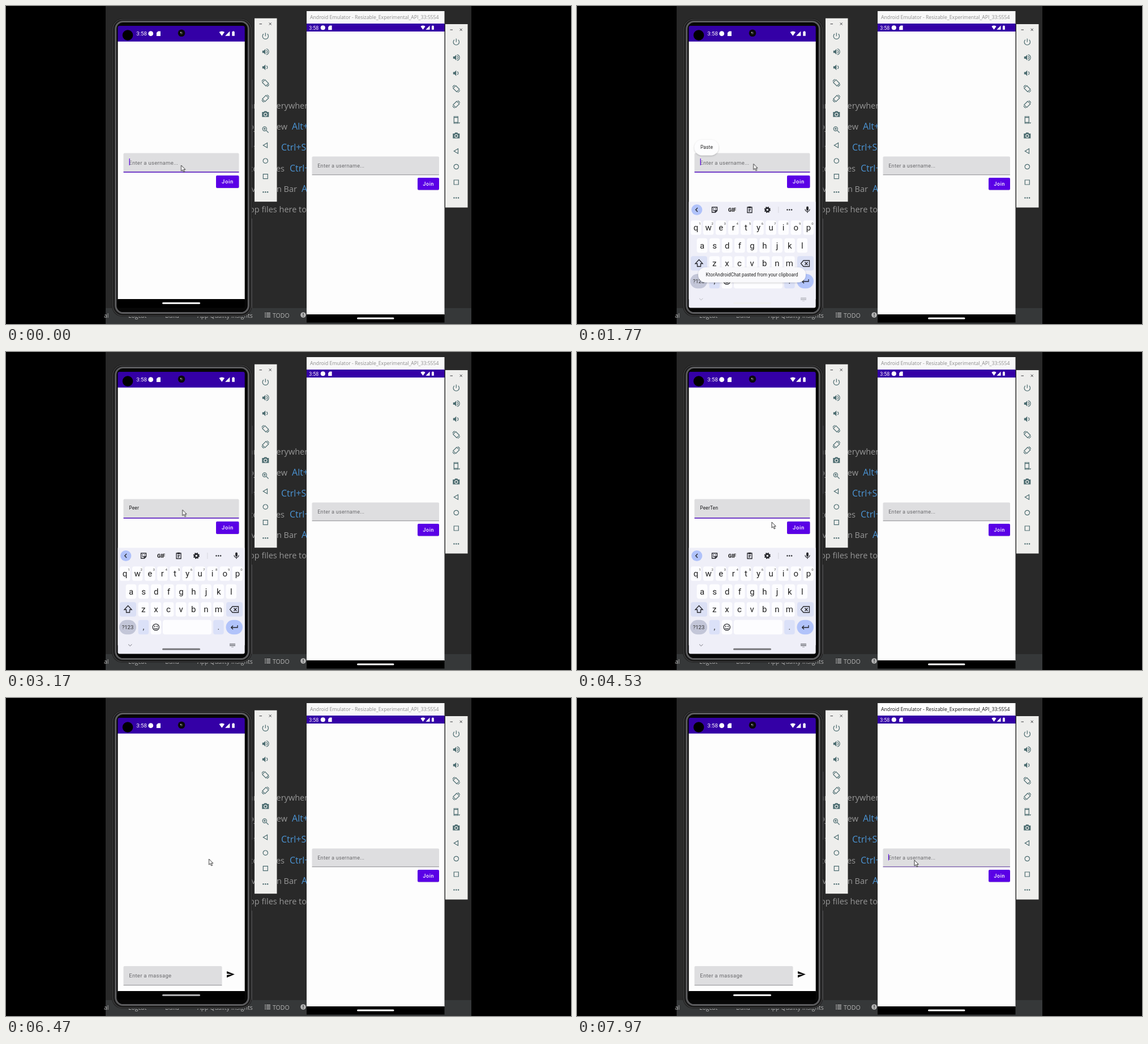
Recreate the animation shown at these times as an HTML page. Size 998 px wide and 561 px high, loop 8 s.

```html
<!DOCTYPE html>
<html lang="en">
<head>
<meta charset="utf-8">
<title>Chat login on two emulators</title>
<style>
html, body { margin: 0; width: 100%; height: 100%; overflow: hidden; background: #000; }
svg { display: block; width: 998px; height: 561px; }
text { font-family: Roboto, sans-serif; white-space: pre; }
.ide text, .title text { font-family: "Open Sans", sans-serif; }
.ide text { font-size: 14.5px; fill: #979797; }
.ide .tab { font-size: 10.5px; fill: #b4b4b4; }
.ide .keys { font-size: 16px; fill: #4b94d4; }
.title text { font-size: 8.7px; }
.hint { fill: #69696c; letter-spacing: .031em; }
.mid { text-anchor: middle; }
.line { fill: none; stroke: #4c6c70; stroke-width: 1.2; }
.solid { fill: #4c6c70; }
.ink { fill: none; stroke: #25262b; stroke-width: 1.3; }

.keyboard, .paste, .toast, .login, .chat, .nav, .home, .focus, .blur, .underline, .pointer { animation: 8s linear infinite; }
.keyboard { animation-name: keyboard; animation-timing-function: ease-out; }
.paste { animation-name: paste; }
.toast { animation-name: toast; }
.login { animation-name: login; }
.chat { animation-name: chat; }
.nav { animation-name: nav; }
.home { animation-name: home; }
.focus { animation-name: focus; }
.blur { animation-name: blur; }
.underline { animation-name: underline; }
.pointer { animation-name: pointer; animation-timing-function: ease-in-out; }

@keyframes keyboard {
  0%, 16.25% { transform: translateY(188px); }
  19.75%, 73.75% { transform: none; }
  76.9%, 100% { transform: translateY(188px); }
}
@keyframes paste {
  0%, 18.75% { opacity: 0; }
  20%, 28.1% { opacity: 1; }
  28.9%, 100% { opacity: 0; }
}
@keyframes toast {
  0%, 19.4% { opacity: 0; transform: translateY(12px); }
  21.25%, 36.25% { opacity: 1; transform: none; }
  38.1%, 100% { opacity: 0; transform: none; }
}
@keyframes login {
  0%, 66.25% { opacity: 1; }
  72.5%, 100% { opacity: 0; }
}
@keyframes chat {
  0%, 66.25% { opacity: 0; }
  72.5%, 100% { opacity: 1; }
}
@keyframes nav {
  0%, 21.5% { opacity: .25; }
  23.75%, 100% { opacity: 1; }
}
@keyframes home {
  0%, 21.9% { fill: #fff; }
  23.75%, 79% { fill: #77777b; }
  83%, 100% { fill: #fff; }
}
@keyframes focus {
  0%, 98.4% { opacity: 0; }
  98.41%, 100% { opacity: 1; }
}
@keyframes blur {
  0%, 98.4% { opacity: 1; }
  98.41%, 100% { opacity: 0; }
}
@keyframes underline {
  0%, 98.4% { opacity: 0; }
  100% { opacity: .55; }
}
@keyframes pointer {
  0%, 10% { transform: translate(309.5px, 281px); }
  13.75%, 48.1% { transform: translate(311.7px, 278.5px); }
  56.6% { transform: translate(344px, 300px); }
  60%, 75% { transform: translate(379px, 308.5px); }
  80%, 84.4% { transform: translate(358.5px, 284px); }
  93.1%, 100% { transform: translate(596px, 286px); }
}
</style>
</head>
<body>
<svg id="stage" viewBox="0 0 998 561"></svg>
<script>
const rect = (x, y, w, h, fill, rx = 0, more = '') =>
  `<rect x="${x}" y="${y}" width="${w}" height="${h}" fill="${fill}" rx="${rx}" ${more}/>`;
const circle = (x, y, r, more) => `<circle cx="${x}" cy="${y}" r="${r}" ${more}/>`;
const label = (x, y, size, str, more = 'fill="#222"') =>
  `<text x="${x}" y="${y}" font-size="${size}" ${more}>${str}</text>`;
const path = (d, cls = 'line', more = '') => `<path d="${d}" class="${cls}" ${more}/>`;
const group = (cls, body, more = '') => `<g class="${cls}" ${more}>${body}</g>`;
const at = (x, y, body, scale = 1) => `<g transform="translate(${x} ${y}) scale(${scale})">${body}</g>`;

const PURPLE = '#3400a6', ACCENT = '#5a00e6', PAGE = '#fdfdfd', FIELD = '#dedee0';

function ide() {
  const rows = [
    [181, 541, 'Search Everywhere', 560, ''],
    [218, 497, 'Project View', 505, 'Alt+1'],
    [255, 478, 'Go to File', 486, 'Ctrl+Shift+N'],
    [292, 492, 'Recent Files', 501, 'Ctrl+E'],
    [328, 514, 'Navigation Bar', 522, 'Alt+Home'],
    [364, 531, 'Drop files here to', 560, '']
  ];
  const tips = rows.map(([y, end, name, x, keys]) =>
    `<text x="${end}" y="${y}" text-anchor="end">${name}</text><text class="keys" x="${x}" y="${y}">${keys}</text>`);
  const tabs = [[173, 'al'], [216, 'Logcat'], [281, 'Build'], [338, 'App Quality Insights'], [471, 'TODO']]
    .map(([x, name]) => `<text class="tab" x="${x}" y="550">${name}</text>`);
  const list = [541, 544.3, 547.6].map(y => rect(457, y, 2, 1.6, '#b4b4b4') + rect(460, y, 7, 1.6, '#b4b4b4'));
  return group('ide', rect(176, 0, 646, 561, '#292929') + rect(176, 533, 646, 28, '#363839') +
    tips.join('') + tabs.join('') + list.join('') +
    circle(525, 545, 4.8, 'fill="#b4b4b4"') + rect(524.3, 542, 1.4, 3.6, '#37393b') + rect(524.3, 546.6, 1.4, 1.4, '#37393b'));
}

const signals = (x, y, s) => at(x, y,
  `<path fill="#fff" d="M-4.8-2.6Q0-6 4.8-2.6L0 4ZM14 -4.2V4H5.8ZM18-3.4H19.3V-4.4H21.2V-3.4H22.5V4H18Z"/>`, s);
const notices = (x, y, s) => at(x, y,
  circle(0, 0, 4.4, 'fill="#fff"') +
  `<path fill="#fff" d="M13-4.2H17.2V4.2H10.2V-1.5Z"/>`, s);

function field(x, y, w, h, size, hint, line, cls = '') {
  return rect(x, y, w, h, FIELD, 2) + line +
    label(x + 9.7, y + h / 2 + 3.2, size, hint, `class="hint" ${cls}`);
}

const button = (x, y, w, h, size) => rect(x, y + .8, w, h, '#0002', 2) + rect(x, y, w, h, ACCENT, 2) +
  label(x + w / 2 + .3, y + h / 2 + 3.4, size, 'Join',
    'class="mid" fill="#fff" font-weight="500" letter-spacing=".7"');

const homePill = (x, y, w, more) => rect(x, y, w, 3, '#fff', 1.5, more);

function keyboard() {
  const key = (x, y, w, fill = '#fdfdff', rx = 4) => rect(x - w / 2, y - 12.7, w, 25.4, fill, rx);
  const letters = (str, x0, y) => [...str].map((ch, i) => {
    const x = x0 + i * 22.1;
    return key(x, y, 18.6) + label(x, y + 5, 15, ch, 'class="mid" fill="#222"');
  }).join('');
  const digits = [...'1234567890'].map((d, i) =>
    label(217 + i * 22.1, 385.5, 6, d, 'class="mid" fill="#444"')).join('');
  const tools =
    circle(211.7, 359.5, 9.6, 'fill="#b0c2fa"') + path('M213 356l-3.3 3.5 3.3 3.5', 'ink') +
    at(243, 359.5, path('M-4.5-4.5H4.5V1.5L1.5 4.5H-4.5ZM4.5 1.5H1.5V4.5M-2.5 .3Q0 3 2.3 .3', 'ink') +
      circle(-1.8, -1.7, .8, '') + circle(1.8, -1.7, .8, '')) +
    label(274, 363, 9, 'GIF', 'class="mid" fill="#222" font-weight="900"') +
    at(305, 359.5, path('M-4-4.5H4V5H-4Z', 'ink') + rect(-2.3, -5.8, 4.6, 3, '#25262b') +
      path('M-2-.5H2M-2 2H1', 'ink', 'stroke-width=".9"')) +
    at(336.3, 359.5, circle(0, 0, 3.1, 'class="ink" style="stroke-width:2.6"') +
      circle(0, 0, 4.7, 'class="ink" style="stroke-width:1.8" stroke-dasharray="2 1.7"')) +
    rect(355.5, 354, .8, 11, '#cfd0d8') +
    [371.5, 375.3, 379.1].map(x => circle(x, 359.5, 1.2, 'fill="#25262b"')).join('') +
    at(407, 359, rect(-1.9, -5.5, 3.8, 7.4, '#25262b', 1.9) + path('M-4-.5A4 4 0 0 0 4-.5M0 3.5V6', 'ink'));
  const edges =
    key(215.5, 454, 29, '#dbe0f5') + path('M215.5 447.5L222 454.5H218.5V459.5H212.5V454.5H209Z', 'ink') +
    key(403.5, 454, 29, '#dbe0f5') + path('M400 449H410.5V459.5H400L395.5 454.3ZM402.5 451.7l5 5m0-5l-5 5', 'ink') +
    key(215, 485.5, 30, '#c3c6d8', 12.7) + label(215, 489, 9.5, '?123', 'class="mid" fill="#333"') +
    key(242.8, 485.5, 18.6, '#dbe1f8') + label(242.8, 490, 14, ',', 'class="mid" fill="#333"') +
    key(264.8, 485.5, 18.6) +
    at(264.8, 485.5, circle(0, 0, 5.6, 'class="ink"') + circle(-2, -1.5, .9, '') + circle(2, -1.5, .9, '') + path('M-3 1.3Q0 5 3 1.3', 'ink')) +
    key(320, 485.5, 86) +
    key(375.4, 485.5, 18.6, '#dbe1f8') + label(375.4, 490, 14, '.', 'class="mid" fill="#333"') +
    key(403.2, 485.5, 29.5, '#b1c3fa', 12.7) + path('M409 482V486H398M401 482.7L397.7 486L401 489.3', 'ink');
  const keysIcon = rect(395, 514, 10, 5, '#9a9ba2', .6) +
    [396.5, 398.7, 400.9, 403].map(x => rect(x, 515.3, .9, .9, '#efeff8')).join('') + rect(398, 520, 4, .9, '#9a9ba2');
  const bar = group('nav', path('M216 515.7l3.2 3 3.2-3', 'ink', 'style="stroke:#77787f;stroke-width:1"') + keysIcon);
  return group('keyboard', rect(197, 345.5, 225, 188, '#efeff8') + tools +
    letters('qwertyuiop', 210, 391) + digits + letters('asdfghjkl', 221, 422.5) +
    letters('zxcvbnm', 242.8, 454) + edges + bar);
}

function leftPhone() {
  const frame = rect(187, 22, 247.5, 526, '#1a1a1a', 19) +
    rect(188.5, 23.5, 244.5, 523, 'none', 18, 'stroke="#3c3c3d" stroke-width="1.6"') +
    rect(193.7, 27.5, 234.6, 514, '#070707', 13, 'stroke="#5c5c5e" stroke-width="3"') +
    rect(434.3, 130, 1.4, 120, '#3e3e40') + rect(434, 375, 1, 158, '#4b4b4d');
  const login = group('login',
    field(207.5, 259.5, 204, 34, 9.5, 'Enter a username...', rect(207.5, 292.3, 204, 1.5, '#4c08bd'), 'id="hint"') +
    label(217.2, 278, 8.3, '', 'id="name" fill="#18181a" letter-spacing=".26"') +
    rect(217.6, 269, 1.2, 12, ACCENT, 0, 'id="caret"') + button(371, 299, 40.5, 22, 9.4));
  const chat = group('chat',
    field(207.5, 473, 174, 34, 9.5, 'Enter a massage', rect(207.5, 506.2, 174, 1, '#8d8d90')) +
    '<path d="M390 482L403.8 487.5L390 493.2V488.8L399 487.5L390 486.3Z" fill="#0a0a0a"/>');
  const paste = group('paste', rect(207.5, 236, 42.5, 27.5, '#fdfdfe', 13.5, 'filter="url(#soft)"') +
    label(229, 252.3, 8.5, 'Paste', 'class="mid" fill="#222" letter-spacing=".1"'));
  const toast = group('toast', rect(214, 461, 190, 26.5, '#f9f9fc', 13, 'filter="url(#soft)"') +
    label(309, 477.4, 8.3, 'KtorAndroidChat pasted from your clipboard', 'class="mid" fill="#222"'));
  const screen = rect(197, 35, 225, 28, PURPLE) + rect(197, 62.7, 225, 455, PAGE) + rect(197, 517, 225, 16, '#000') +
    login + chat + paste + keyboard() + homePill(276, 522.8, 67, 'class="home"') + toast +
    circle(215, 51.5, 9.3, 'fill="#000"') + circle(310, 47.7, 6.3, 'fill="#0a0a0a"') +
    circle(310, 47.7, 2.2, 'fill="#3a3a3a"') + circle(308.6, 46.6, .9, 'fill="#ddd"') +
    label(230.3, 52.2, 9.6, '3:58', 'fill="#fff"') + notices(255.7, 48.7, 1) + signals(381.3, 48.7, 1);
  return frame + `<g clip-path="url(#glass)">${screen}</g>`;
}

function rightWindow() {
  const title = (cls, bg, ink) => group(cls, rect(531, 9, 243.5, 22.5, bg) +
    `<text x="537" y="23.2" fill="${ink}">Android Emulator - Resizable_Experimental_API_33:5554</text>`);
  const line = rect(540.5, 297.3, 224.5, 1, '#8d8d90') +
    rect(540.5, 297, 224.5, 1.3, '#4c08bd', 0, 'class="underline"');
  return group('title', title('blur', '#f8f8f8', '#8b8b8b') + title('focus', '#fff', '#111')) +
    rect(531, 31, 243.5, 14.5, PURPLE) + rect(531, 45, 243.5, 499.5, PAGE) + rect(531, 544, 243.5, 14.5, '#000') +
    homePill(620, 549.6, 65.5, '') +
    label(535.2, 41.7, 8.9, '3:58', 'fill="#fff"') + notices(559.8, 38.3, .92) + signals(736.5, 38.2, .86) +
    field(540.5, 265.5, 224.5, 32.5, 9.05, 'Enter a username...', line) +
    group('focus', rect(549.9, 275.5, 1.1, 11, ACCENT)) + button(727, 303, 38, 21.5, 8.8);
}

function toolbar(x, y, withPhone) {
  const speaker = path('M-5.5-2H-3L0-5V5L-3 2H-5.5Z', 'solid');
  const turn = path('M-.8-5.5L5.5 .8L.8 5.5L-5.5-.8ZM-6.4-2.6A6.5 6.5 0 0 1-2.6-6.4M6.4 2.6A6.5 6.5 0 0 1 2.6 6.4');
  const camera = path('M-6-3.6H-3L-2-5.2H2L3-3.6H6V5H-6Z', 'solid') +
    circle(0, .7, 2.6, 'fill="none" stroke="#eeeeec" stroke-width="1.2"');
  const phone = path('M-4-6H3V6H-4ZM-4-4.4H3M-4 4.4H3') + path('M3.5 4.5H7L5.2 6.8Z', 'solid');
  const zoom = path('M1.2 1.2L5.3 5.3M-3.4-1.5H.4M-1.5-3.4V.4') + circle(-1.5, -1.5, 3.6, 'class="line"');
  const icons = [
    path('M-3.4-3.9A5.2 5.2 0 1 0 3.4-3.9M0-6V0'),
    speaker + path('M1.5-2.6A2.8 2.8 0 0 1 1.5 2.6M1.5-5.2A5.3 5.3 0 0 1 1.5 5.2'),
    speaker + path('M1.8-2.6A2.8 2.8 0 0 1 1.8 2.6'),
    turn,
    `<g transform="scale(-1 1)">${turn}</g>`,
    ...(withPhone ? [phone, camera] : [camera, zoom]),
    path('M3.2-4.3L-4 0L3.2 4.3Z'),
    circle(0, 0, 4.2, 'class="line"'),
    path('M-4-4H4V4H-4Z'),
    [-3.8, 0, 3.8].map(dx => circle(dx, 0, 1.2, 'class="solid"')).join('')
  ];
  return rect(x, y, 39.5, 323.5, '#eeeeec') +
    path(`M${x + 8.5} ${y + 10}h4.5M${x + 25.7} ${y + 7.8}l4 4m0-4l-4 4`, 'ink', 'style="stroke-width:.9"') +
    icons.map((icon, i) => at(x + 19.3, y + 31.5 + i * 27.5, icon)).join('');
}

const stage = document.getElementById('stage');
stage.innerHTML = `<defs>
  <clipPath id="glass">${rect(197.5, 35, 224.2, 497.5, '#000', 3)}</clipPath>
  <filter id="soft" x="-20%" y="-40%" width="140%" height="190%"><feDropShadow dx="0" dy="1" stdDeviation="1.6" flood-opacity=".22"/></filter>
  </defs>` + ide() + leftPhone() + toolbar(439, 21.7, false) + rightWindow() + toolbar(776, 32, true) +
  group('pointer', '<path d="M0 0V10.2L2.4 8L4.2 12L6 11.2L4.2 7.4H7.2Z" fill="#fff" stroke="#222" stroke-width=".9"/>');

// Typing and the caret, which restarts its blink on every input.
const NAME = 'PeerTen';
const strokes = [2250, 2400, 2500, 2620, 3400, 3550, 3700];
const [hint, nameText, caret] = ['hint', 'name', 'caret'].map(id => document.getElementById(id));
let start;
function draw(now) {
  start ??= now;
  const t = (now - start) % 8000;
  const typed = strokes.filter(s => s <= t).length;
  const lastInput = [0, 1300, ...strokes].filter(s => s <= t).pop();
  nameText.textContent = NAME.slice(0, typed);
  hint.style.opacity = typed ? 0 : 1;
  caret.setAttribute('x', 217.6 + (typed ? nameText.getComputedTextLength() : 0));
  caret.style.opacity = (t - lastInput) % 1000 < 500 ? 1 : 0;
  requestAnimationFrame(draw);
}
requestAnimationFrame(draw);
</script>
</body>
</html>
```
